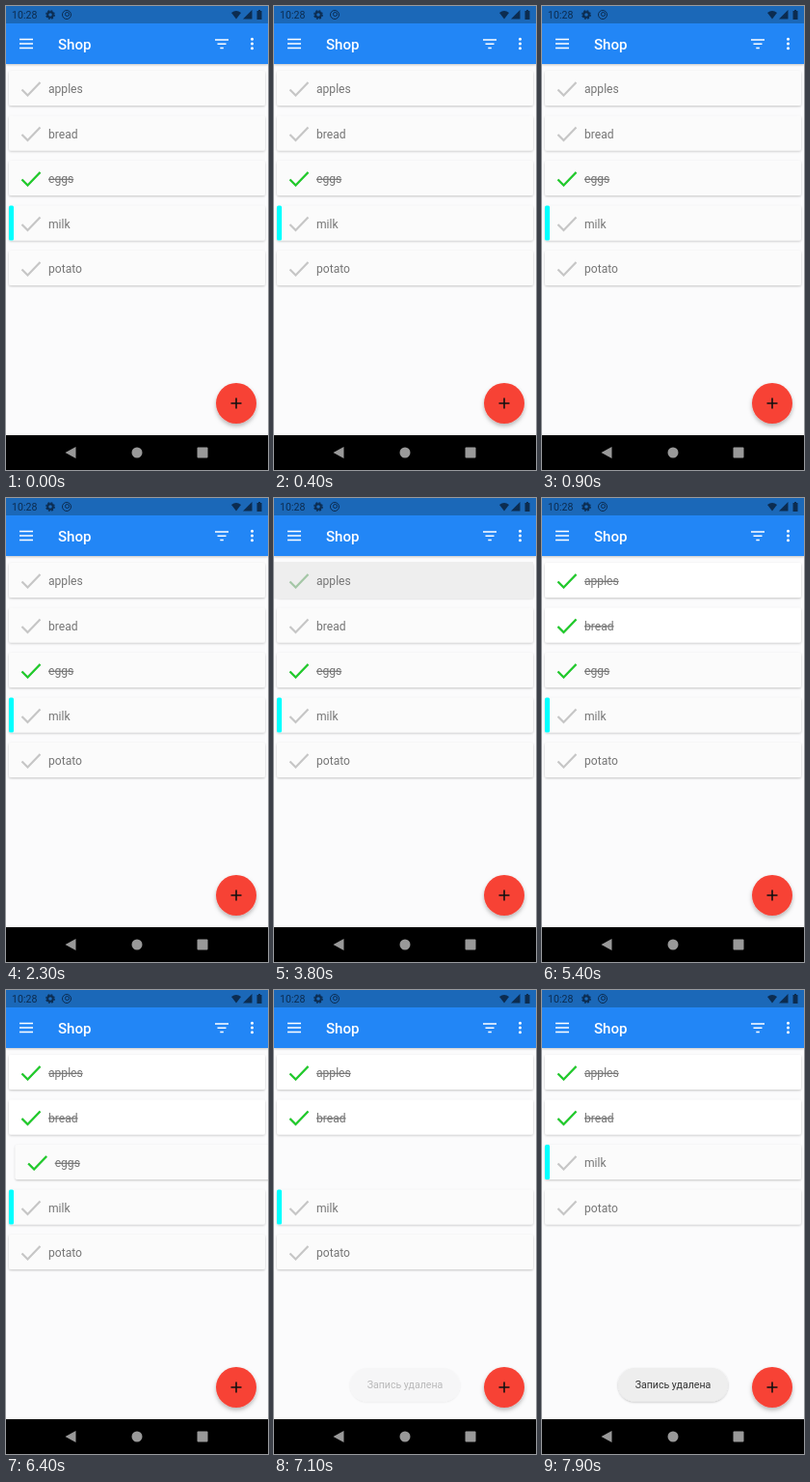
An HTML page that plays this animation: 272 by 480 pixels, repeating every 8 s.

```html
<!DOCTYPE html>
<html lang="en">
<head>
<meta charset="utf-8">
<title>Shopping list</title>
<style>
  html, body { margin: 0; width: 100%; height: 100%; overflow: hidden; background: #fbfbfb; }
  svg { display: block; width: 100vw; height: 100vh; }
  text { font-family: Roboto, "Noto Sans", sans-serif; }
  .item text { font-size: 12.1px; fill: #757575; }
  .item path { fill: none; stroke-width: 2.2; }
  .done text { text-decoration: line-through; }
</style>
</head>
<body>
<svg viewBox="0 0 272 480">
  <defs>
    <filter id="soft" x="-20%" y="-20%" width="140%" height="150%">
      <feDropShadow dx="0" dy="1" stdDeviation="0.8" flood-opacity=".22"/>
    </filter>
    <filter id="lift" x="-30%" y="-30%" width="160%" height="170%">
      <feDropShadow dx="0" dy="2.5" stdDeviation="2" flood-opacity=".28"/>
    </filter>
  </defs>
  <rect width="272" height="480" fill="#fbfbfc"/>
  <g id="list"></g>

  <g id="toast">
    <rect x="79" y="391" width="114" height="34.5" rx="17" fill="#eee" filter="url(#soft)"/>
    <text x="136" y="412" text-anchor="middle" font-size="10.6" fill="#333">Запись удалена</text>
  </g>
  <g filter="url(#lift)"><circle cx="239" cy="411" r="21" fill="#f74236"/></g>
  <path d="M233.5 411h11M239 405.500v11" stroke="#111" stroke-width="1.6"/>

  <rect y="18" width="272" height="42" fill="#2186f6" filter="url(#soft)"/>
  <rect width="272" height="18" fill="#1b68b8"/>
  <text x="54" y="45" font-size="15.1" font-weight="500" fill="#fff">Shop</text>
  <path d="M14 34.500h14M14 39h14M14 43.500h14M217 35h14M219.500 39.200h9M222.300 43.400h3.500" stroke="#fff" stroke-width="1.500"/>
  <g fill="#fff">
    <circle cx="255.500" cy="34.300" r="1.500"/>
    <circle cx="255.500" cy="39" r="1.500"/>
    <circle cx="255.500" cy="43.700" r="1.500"/>
  </g>

  <g fill="#0c2c50">
    <text x="6" y="13" font-size="10.6">10:28</text>
    <path d="M234 7q5-4 10 0l-5 6.500z"/>
    <path d="M255.500 4v9.500h-9.500z"/>
    <path d="M260.500 5h1.500v-1h2v1h1.500v9h-5z"/>
    <circle cx="46" cy="9" r="2.800" fill="none" stroke="#0c2c50" stroke-width="2"/>
    <circle cx="46" cy="9" r="4.200" fill="none" stroke="#0c2c50" stroke-width="1.300" stroke-dasharray="2 1.300"/>
    <circle cx="63" cy="9" r="4.500" fill="none" stroke="#0c2c50"/>
    <circle cx="63.500" cy="8.500" r="2" fill="none" stroke="#0c2c50"/>
  </g>

  <rect y="444" width="272" height="36"/>
  <g fill="#999">
    <path d="M61.500 462l11-6v12z"/>
    <circle cx="136" cy="462" r="5.500"/>
    <rect x="198.500" y="456.500" width="11" height="11" rx="1"/>
  </g>
</svg>
<script>
const LOOP = 8000, PITCH = 46.5;
const items = [
  { name: 'apples', tap: 3600 },
  { name: 'bread', tap: 4600 },
  { name: 'eggs', tap: -1000, swipe: 6350 },
  { name: 'milk', tap: Infinity, shift: 7150, mark: true },
  { name: 'potato', tap: Infinity, shift: 7150 }
];
const ramp = (t, from, to) => Math.min(1, Math.max(0, (t - from) / (to - from)));
const ease = p => p * p * (3 - 2 * p);
const tick = color => `<path d="M16.500 20.500l6 6L35.500 13" stroke="${color}"/>`;

const list = document.getElementById('list');
const toast = document.getElementById('toast');

for (const item of items) {
  const g = document.createElementNS('http://www.w3.org/2000/svg', 'g');
  g.innerHTML = `
    <rect class="card" x="3" y="1" width="266" height="36" rx="2" filter="url(#soft)"/>
    <rect class="press" y="0" width="269" height="38.500" fill="#eee"/>
    ${item.mark ? '<rect x="3" y="1" width="5" height="36" rx="1.500" fill="#0ff"/>' : ''}
    ${tick('#c6c6c6')}<g class="green">${tick('#20cc2b')}</g>
    <text x="44" y="24">${item.name}</text>`;
  list.append(g);
  item.g = g;
  for (const part of ['card', 'press', 'green']) item[part] = g.querySelector('.' + part);
}

function draw(t) {
  items.forEach((item, i) => {
    const { tap, swipe, shift } = item;
    const since = t - tap;
    const x = swipe ? 275 * ease(ramp(t, swipe, swipe + 550)) : 0;
    const up = shift ? PITCH * ease(ramp(t, shift, shift + 300)) : 0;
    item.g.setAttribute('transform', `translate(${x} ${66 + PITCH * i - up})`);
    item.g.setAttribute('class', since >= 300 ? 'item done' : 'item');
    item.card.setAttribute('fill', since >= 300 && !swipe ? '#fff' : '#fbfbfb');
    item.press.setAttribute('opacity', ramp(since, 0, 150) * (1 - ramp(since, 300, 650)));
    item.green.setAttribute('opacity', ramp(since, 150, 400));
  });
  toast.setAttribute('opacity', ramp(t, 6980, 7350));
}

function frame() {
  draw(performance.now() % LOOP);
  requestAnimationFrame(frame);
}
frame();
</script>
</body>
</html>
```
